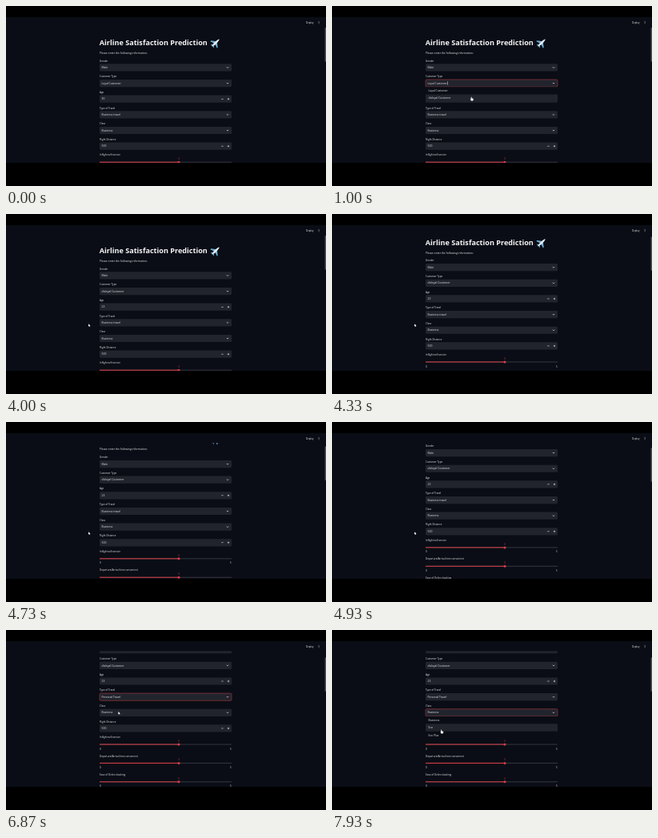
Recreate the animation shown at these times as an HTML page with a canvas. Size 400 px wide and 225 px high, loop 8000 ms.

```html
<!DOCTYPE html>
<html lang="en">
<head>
<meta charset="utf-8">
<title>Airline Satisfaction Prediction</title>
<style>
html, body { margin: 0; width: 100%; height: 100%; overflow: hidden; background: #000; }
canvas { display: block; width: 400px; height: 225px; }
</style>
</head>
<body>
<canvas id="stage" width="400" height="225"></canvas>
<script>
const ctx = document.getElementById('stage').getContext('2d');
const LOOP = 8000;
const BG = '#0a0d15', FIELD = '#22242d', RED = '#d93e49', EDGE = '#a83640', INK = '#e6e7ea';
const LEFT = 117, WIDTH = 165, ROW = 19.65;
const FONT = '"Open Sans", "Noto Sans", sans-serif';

// [time, value...] keys, linear between neighbours
function track(keys, t) {
  if (t <= keys[0][0]) return keys[0].slice(1);
  for (let i = 1; i < keys.length; i++) {
    const a = keys[i - 1], b = keys[i];
    if (t < b[0]) {
      const k = (t - a[0]) / (b[0] - a[0]);
      return a.slice(1).map((v, j) => v + (b[j + 1] - v) * k);
    }
  }
  return keys[keys.length - 1].slice(1);
}

const SCROLL = [[4070, 0], [4330, 10.2], [4730, 24.3], [5130, 52.2]];

const POINTER = [
  { from: 530, to: 1670, hand: true, keys: [[530, 172, 99], [930, 175, 116]] },
  { from: 1670, to: 2070, keys: [[1670, 175, 116], [2070, 150, 117]] },
  { from: 3470, to: 5530, keys: [[3470, 150, 117], [3930, 104, 139], [5070, 104, 139], [5200, 130, 116], [5530, 146, 86]] },
  { from: 5930, to: 6600, hand: true, keys: [[5930, 146, 88], [6200, 144, 103]] },
  { from: 6600, to: 7000, keys: [[6600, 144, 103], [7000, 140, 104]] },
  { from: 7130, to: 8000, hand: true, keys: [[7130, 140, 106], [7530, 138, 114], [7800, 137.5, 127]] }
];

const MENUS = [
  { from: 130, to: 1400, row: 1, items: ['Loyal Customer', 'disloyal Customer'], pick: t => t < 800 ? 0 : 1 },
  { from: 5730, to: 6470, row: 3, items: ['Business travel', 'Personal Travel'], pick: t => t < 6130 ? -1 : 1 },
  { from: 7070, to: 8000, row: 4, items: ['Business', 'Eco', 'Eco Plus'], pick: t => t < 7670 ? 0 : 1 }
];

const SLIDERS = ['Inflight wifi service', 'Departure/Arrival time convenient', 'Ease of Online booking'];

function text(str, x, y, size, color = INK, weight = 400) {
  ctx.font = `${weight} ${size}px ${FONT}`;
  ctx.fillStyle = color;
  ctx.fillText(str, x, y + size * 0.35);
  return x + ctx.measureText(str).width;
}

function rect(x, y, w, h, color) {
  ctx.fillStyle = color;
  ctx.fillRect(x, y, w, h);
}

function box(x, y, w, h, r) {
  ctx.beginPath();
  ctx.roundRect(x, y, w, h, r);
}

function line(points, color, width) {
  ctx.beginPath();
  points.forEach(([x, y]) => ctx.lineTo(x, y));
  ctx.strokeStyle = color;
  ctx.lineWidth = width;
  ctx.stroke();
}

function shape(points, color) {
  ctx.beginPath();
  points.forEach(([x, y]) => ctx.lineTo(x, y));
  ctx.closePath();
  ctx.fillStyle = color;
  ctx.fill();
}

function plane(x, y) {
  ctx.save();
  ctx.translate(x, y);
  ctx.rotate(Math.PI / 4);
  shape([[0, -2.4], [6, 2.2], [6, 3.4], [0, 1.5], [-6, 3.4], [-6, 2.2]], '#6fb4dc');
  shape([[0, 3.4], [2.6, 5.4], [2.6, 6.2], [0, 5.6], [-2.6, 6.2], [-2.6, 5.4]], '#6fb4dc');
  ctx.beginPath();
  ctx.ellipse(0, 0, 1.25, 6.4, 0, 0, Math.PI * 2);
  ctx.fillStyle = '#e3eaf0';
  ctx.fill();
  ctx.restore();
}

function field(row, label, value, t, focus, caret) {
  const cy = 76.9 + row * ROW;
  text(label, LEFT, cy - 8.4, 3);
  box(LEFT, cy - 4.6, WIDTH, 9.2, 1.3);
  ctx.fillStyle = FIELD;
  ctx.fill();
  if (focus) {
    ctx.strokeStyle = EDGE;
    ctx.lineWidth = 0.6;
    ctx.stroke();
  }
  const end = text(value, LEFT + 2.6, cy, 3.35);
  if (caret) rect(end + 0.2, cy - 2.2, 0.5, 4.4, INK);
  if (row === 2 || row === 5) {
    const color = focus ? '#b9525c' : INK;
    rect(269.2, cy - 0.3, 2.4, 0.6, color);
    rect(276.8, cy - 0.3, 2.4, 0.6, color);
    rect(277.7, cy - 1.2, 0.6, 2.4, color);
  } else {
    line([[275.8, cy - 0.6], [277, cy + 0.6], [278.2, cy - 0.6]], INK, 0.7);
  }
}

function slider(i) {
  const y = 195.2 + i * 23.4, knob = LEFT + WIDTH * 0.6;
  text(SLIDERS[i], LEFT, y - 8.9, 3);
  rect(LEFT, y - 0.5, WIDTH, 1, '#343741');
  rect(LEFT, y - 0.5, knob - LEFT, 1, RED);
  ctx.beginPath();
  ctx.arc(knob, y, 1.5, 0, Math.PI * 2);
  ctx.fillStyle = RED;
  ctx.fill();
  text('3', knob - 0.9, y - 4, 3, RED);
  text('0', LEFT + 0.1, y + 5.5, 3);
  text('5', 280, y + 5.5, 3);
}

function menu(m, t) {
  const top = 76.9 + m.row * ROW + 4.6, step = 9.4, chosen = m.pick(t);
  box(LEFT, top, WIDTH, m.items.length * step, 1);
  ctx.fillStyle = BG;
  ctx.fill();
  m.items.forEach((item, i) => {
    const y = top + i * step;
    if (i === chosen) rect(LEFT, y, WIDTH, step, FIELD);
    text(item, LEFT + 3.6, y + step / 2, 3.35);
  });
}

function pointer(t) {
  const p = POINTER.find(p => t >= p.from && t < p.to);
  if (!p) return;
  const [x, y] = track(p.keys, t);
  ctx.save();
  ctx.translate(x, y);
  if (p.hand) {
    box(-1.3, -2.4, 0.9, 4, 0.4);
    ctx.fillStyle = '#fff';
    ctx.fill();
    box(-1.6, -0.6, 3.2, 3, 0.8);
    ctx.fill();
  } else {
    shape([[-0.9, -1.8], [-0.9, 1.8], [0, 1], [0.6, 2.1], [1.1, 1.8], [0.6, 0.8], [1.6, 0.7]], '#fff');
  }
  ctx.restore();
}

function ageText(t) {
  if (t < 2270) return '30';
  if (t < 2930) return '';
  return t < 3130 ? '2' : '23';
}

function draw(t) {
  const [scroll] = track(SCROLL, t);
  const within = (a, b) => t >= a && t < b;
  const open = MENUS.find(m => within(m.from, m.to));
  const caretAt = row => !!open && open.row === row;

  rect(0, 0, 400, 225, '#000');
  ctx.save();
  ctx.beginPath();
  ctx.rect(0, 14, 400, 182);
  ctx.clip();
  rect(0, 14, 400, 182, BG);

  ctx.save();
  ctx.translate(0, -scroll);
  text('Airline Satisfaction Prediction', LEFT - 0.3, 46.1, 9.1, '#f5f5f7', 700);
  plane(262, 46);
  text('Please enter the following information:', LEFT, 58.6, 3.3);

  field(0, 'Gender', 'Male', t);
  field(1, 'Customer Type', t < 1400 ? 'Loyal Customer' : 'disloyal Customer', t, within(130, 2000), caretAt(1));
  const typing = within(2000, 3600);
  field(2, 'Age', ageText(t), t, typing, typing);
  if (within(2270, 3470)) text('Press Enter to apply', 241, 118.3, 2.45, '#a5a7ae');
  field(3, 'Type of Travel', t < 6470 ? 'Business travel' : 'Personal Travel', t, within(5730, 7070), caretAt(3));
  field(4, 'Class', 'Business', t, t >= 7070);
  field(5, 'Flight Distance', '500', t);
  SLIDERS.forEach((_, i) => slider(i));
  if (open) menu(open, t);
  ctx.restore();

  rect(0, 14, 400, 12.3, BG);
  text('Deploy', 375, 20.6, 2.95);
  [-1.3, 0, 1.3].forEach(d => rect(390.7, 20.2 + d, 0.7, 0.7, INK));
  box(398.6, 27 + scroll * 0.14, 1.4, 42.5, 0.6);
  ctx.fillStyle = '#50535c';
  ctx.fill();
  pointer(t);
  ctx.restore();
}

function frame() {
  draw(performance.now() % LOOP);
  requestAnimationFrame(frame);
}
frame();
</script>
</body>
</html>
```
